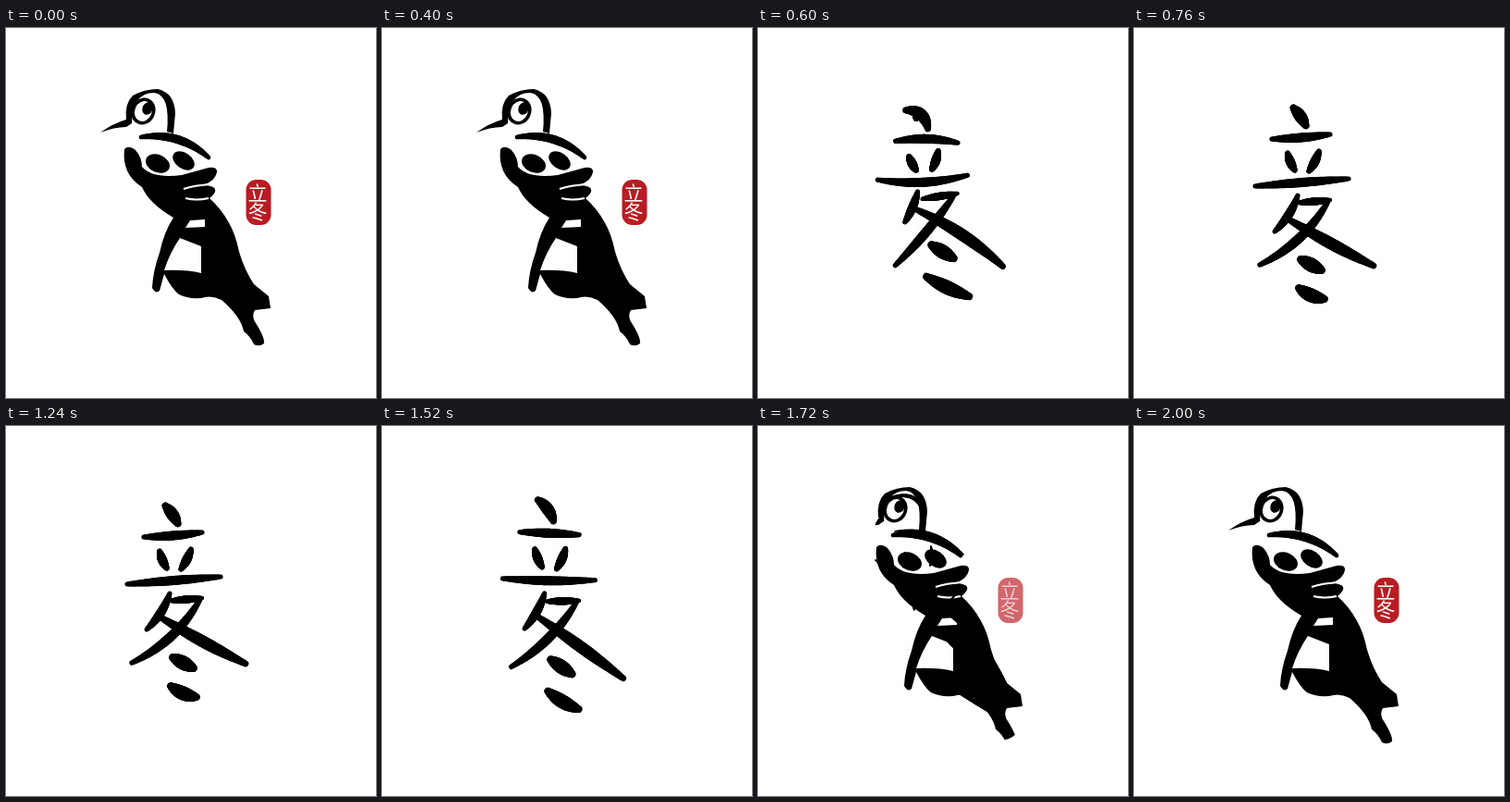
An HTML page with a canvas that plays this animation: 400x400 px, repeating every 2.16 s.

```html
<!DOCTYPE html>
<html lang="zh">
<head>
<meta charset="utf-8">
<title>立冬</title>
<style>
html, body { margin: 0; width: 100%; height: 100%; overflow: hidden; background: #fff; }
canvas { display: block; width: 400px; height: 400px; }
</style>
</head>
<body>
<canvas id="stage" width="400" height="400"></canvas>
<script>
const SIZE = 400, LOOP = 2160, STEP = 40;
const ctx = document.getElementById('stage').getContext('2d');

// A stroke has a weight and two poses, in the character and in the bird:
// start x, y, end x, y and how far the middle bends off the straight line.
const stroke = (weight, glyph, bird) => ({ weight, glyph, bird });
const strokes = [
  stroke(6.5, [172, 86, 186, 106, -1], [141, 78, 180, 106, -16]),
  stroke(5, [149, 120, 212, 115, 1], [148, 114, 222, 139, -10]),
  stroke(5, [166, 135, 174, 154, 1], [159, 137, 167, 152, 0]),
  stroke(5, [200, 133, 189, 155, -1], [187, 130, 186, 151, -1]),
  stroke(5, [131, 171, 232, 163, 0], [127, 145, 218, 162, 13]),
  stroke(4.8, [177, 181, 152, 220, -3], [166, 172, 169, 199, 1]),
  stroke(4.2, [178, 189, 212, 186, 0], [177, 182, 221, 178, 0]),
  stroke(5.2, [210, 187, 136, 256, -8], [214, 182, 167, 267, 6]),
  stroke(6.5, [169, 208, 259, 257, 1], [180, 186, 273, 290, -12]),
  stroke(7.5, [180, 250, 203, 262, 0], [198, 224, 225, 250, 0]),
  stroke(7.5, [178, 281, 206, 293, 2], [188, 268, 262, 316, 0]),
  stroke(3, [177, 92, 182, 99, 0], [158, 82, 155, 89, 0])
];

// The character sways once on its way in and once on its way out.
const keys = [
  { t: 0, bird: 1, sway: 0, ink: 1 },
  { t: 400, bird: 1, sway: 0, ink: 1 },
  { t: 520, bird: 1, sway: 0, ink: 0 },
  { t: 600, bird: 0.4, sway: -1, ink: 0 },
  { t: 680, bird: 0.12, sway: 1, ink: 0 },
  { t: 760, bird: 0, sway: 0, ink: 0 },
  { t: 1480, bird: 0, sway: 0, ink: 0 },
  { t: 1520, bird: 0.12, sway: 1, ink: 0 },
  { t: 1580, bird: 0.4, sway: -1, ink: 0 },
  { t: 1640, bird: 1, sway: 0, ink: 0 },
  { t: 1760, bird: 1, sway: 0, ink: 1 },
  { t: LOOP, bird: 1, sway: 0, ink: 1 }
];

const body = new Path2D(
  'M128 131Q132 126 140 132Q147 140 147 150Q158 163 190 159L219 151' +
  'Q229 150 228 156Q226 165 215 169L224 172Q230 176 220 184' +
  'Q233 196 240 209Q248 222 252 242Q258 262 268 277L284 290L286 303L269 305' +
  'Q265 312 270 319Q280 335 279 341Q274 345 268 342Q264 333 257 328' +
  'Q254 312 233 294Q222 288 211 292Q196 293 187 288Q180 283 171 266' +
  'L166 284Q162 288 158 281Q159 262 166 243Q171 220 181 205' +
  'Q155 190 147 172Q125 158 128 131Z');
const gaps = new Path2D(
  'M199 208L215 207L215 215L194 216ZM188 227L211 236L211 265Q195 261 171 262Q177 243 188 227Z');
const slivers = new Path2D('M192 174Q203 170 222 169M194 184Q206 187 219 184');
const head = new Path2D(
  'M102 113Q116 103 130 99Q128 82 137 73Q150 66 164 66Q182 70 183 92L181 114L174 112' +
  'Q178 72 160 70Q137 70 136 103L130 107Q117 107 102 113Z');

function layer() {
  const c = document.createElement('canvas');
  c.width = c.height = SIZE;
  return c.getContext('2d');
}

function oval(g, x, y, rx, ry, turn) {
  g.beginPath();
  g.ellipse(x, y, rx, ry, turn, 0, Math.PI * 2);
}

// Thin at both ends and full in the middle, like a pressed brush
function brush(g, [x0, y0, x1, y1, bend], weight, grow = 0) {
  const dx = x1 - x0, dy = y1 - y0, len = Math.hypot(dx, dy), n = 40;
  const point = u => {
    const off = bend * 4 * u * (1 - u) / len;
    return [x0 + dx * u - dy * off, y0 + dy * u + dx * off];
  };
  g.lineCap = 'round';
  for (let i = 0; i < n; i++) {
    g.lineWidth = weight * (1 + Math.sin(Math.PI * (i + 0.5) / n)) + 2 * grow;
    g.beginPath();
    g.moveTo(...point(i / n));
    g.lineTo(...point((i + 1) / n));
    g.stroke();
  }
}

function paintBird(g) {
  g.fill(body);
  g.globalCompositeOperation = 'destination-out';
  g.fill(gaps);
  g.lineWidth = 2;
  g.stroke(slivers);
  g.globalCompositeOperation = 'source-over';
  g.fill(head);
  brush(g, [146, 118, 219, 140, -9], 4.6);
  oval(g, 164, 146.5, 13.5, 9.5, 0.4);
  g.fill();
  oval(g, 192, 143.5, 13, 8.5, 0.6);
  g.fill();
  g.lineWidth = 3.5;
  oval(g, 148.5, 90, 11, 13, 0.4);
  g.stroke();
  oval(g, 153, 87, 5.5, 7, 0.4);
  g.fill();
}

function drawSeal(alpha) {
  ctx.globalAlpha = alpha;
  ctx.fillStyle = '#b91c23';
  ctx.beginPath();
  ctx.roundRect(259.5, 164, 27, 49, 11);
  ctx.fill();
  ctx.fillStyle = '#fff';
  ctx.font = '500 21px "Noto Sans CJK SC", "Noto Sans CJK", sans-serif';
  ctx.textAlign = 'center';
  ctx.fillText('立', 272, 186);
  ctx.fillText('冬', 272, 206);
  ctx.globalAlpha = 1;
}

const mix = (a, b, k) => a + (b - a) * k;

// Swaying tilts the strokes to the right and stretches them downward.
function pose({ glyph, bird }, amount, sway) {
  const [x0, y0, x1, y1, bend] = glyph.map((v, i) => mix(v, bird[i], amount));
  const shift = (x, y) => y + sway * (0.07 * (x - 180) + 0.06 * (y - 160));
  return [x0, shift(x0, y0), x1, shift(x1, y1), bend];
}

function stateAt(t) {
  const i = keys.findIndex(k => k.t > t), a = keys[i - 1], b = keys[i];
  const k = (t - a.t) / (b.t - a.t);
  return {
    bird: mix(a.bird, b.bird, k),
    sway: mix(a.sway, b.sway, k),
    ink: mix(a.ink, b.ink, k)
  };
}

const bird = layer(), spread = layer();
paintBird(bird);

function draw(t) {
  const now = stateAt(t);
  const paint = (g, scale, grow) => strokes.forEach(s =>
    brush(g, pose(s, now.bird, now.sway), s.weight * scale, grow));

  ctx.fillStyle = '#fff';
  ctx.fillRect(0, 0, SIZE, SIZE);
  if (now.ink === 1) {
    ctx.drawImage(bird.canvas, 0, 0);
  } else {
    paint(ctx, 1 - now.ink);
  }
  if (now.ink > 0 && now.ink < 1) {
    // Ink spreads outward from the strokes until it fills the bird.
    spread.globalCompositeOperation = 'source-over';
    spread.clearRect(0, 0, SIZE, SIZE);
    paint(spread, 1, 45 * now.ink ** 2);
    spread.globalCompositeOperation = 'source-in';
    spread.drawImage(bird.canvas, 0, 0);
    ctx.drawImage(spread.canvas, 0, 0);
  }
  if (now.ink > 0) drawSeal(now.ink);
}

const start = performance.now();
function tick() {
  const t = (performance.now() - start) % LOOP;
  draw(Math.floor(t / STEP) * STEP);
  requestAnimationFrame(tick);
}
tick();
</script>
</body>
</html>
```
